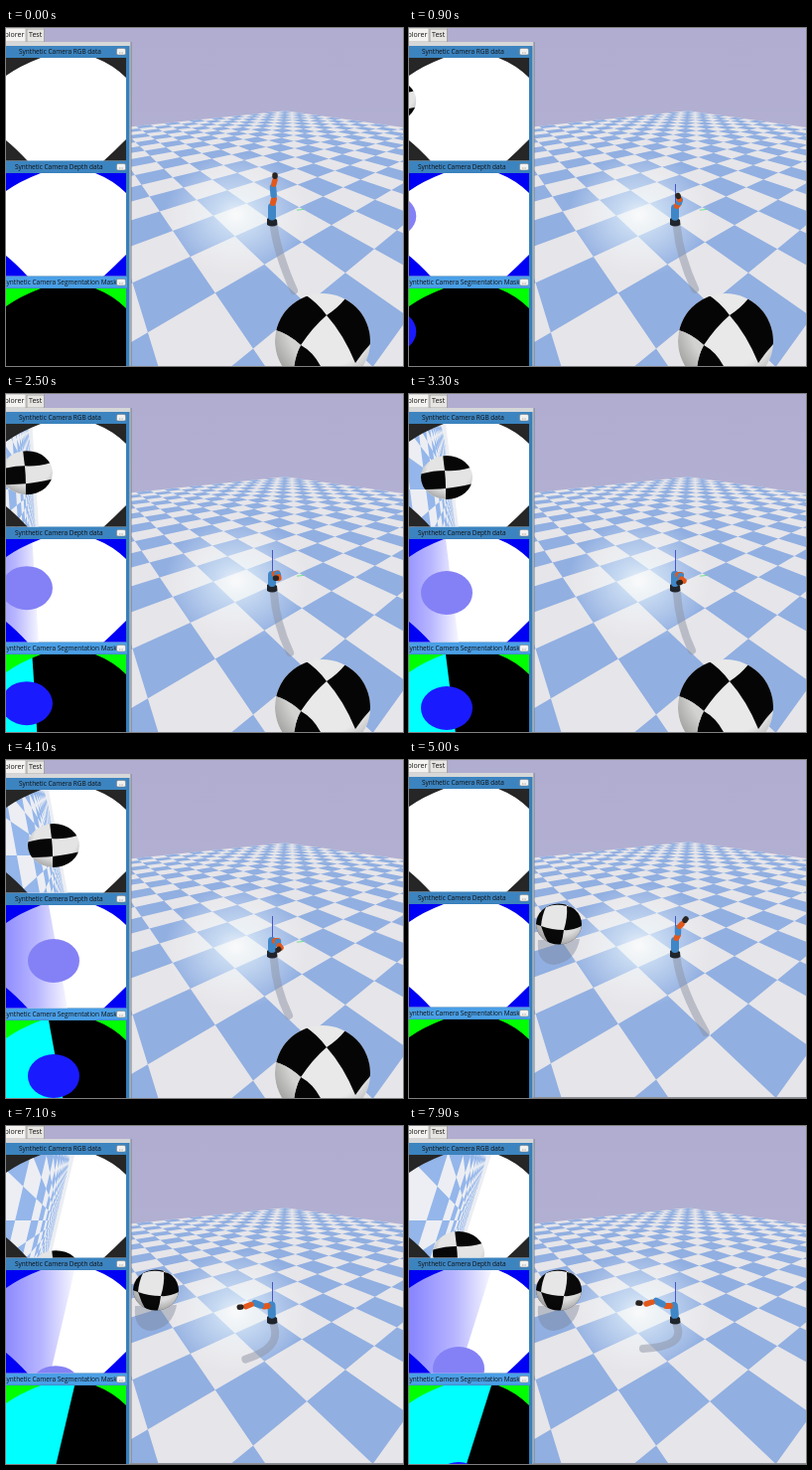
Animation of 400x340 px, one loop 8000 ms. Source, as an HTML page:

```html
<!DOCTYPE html>
<html>
<head>
<meta charset="utf-8">
<style>
html, body { margin: 0; width: 100%; height: 100%; overflow: hidden; background: #b1aed1; }
svg { display: block; width: 400px; height: 340px; }
text { font-family: "Open Sans", "Noto Sans", sans-serif; fill: #111; }
</style>
</head>
<body>
<svg viewBox="0 0 400 340">
  <defs>
    <linearGradient id="sky" x2="0" y2="1"><stop stop-color="#b0add0"/><stop offset="1" stop-color="#b6b5d6"/></linearGradient>
    <radialGradient id="shine"><stop stop-color="#fff" stop-opacity=".8"/><stop offset=".3" stop-color="#f0fbff" stop-opacity=".55"/><stop offset="1" stop-color="#fff" stop-opacity="0"/></radialGradient>
    <linearGradient id="depth"><stop stop-color="#6f6cff"/><stop offset=".45" stop-color="#8b88ff"/><stop offset=".75" stop-color="#b9b7ff"/><stop offset="1" stop-color="#f6f6ff"/></linearGradient>
    <radialGradient id="round" cx=".55" cy=".35" r=".7"><stop offset=".6" stop-opacity="0"/><stop offset="1" stop-opacity=".3"/></radialGradient>
    <clipPath id="view"><rect width="121" height="103.5"/></clipPath>
    <clipPath id="bigClip"><circle cx="319" cy="315" r="48"/></clipPath>
    <clipPath id="smallClip"><ellipse cx="151" cy="165" rx="23" ry="20.5"/></clipPath>
    <clipPath id="camClip"><ellipse rx="26" ry="22"/></clipPath>
  </defs>
  <rect width="400" height="340" fill="url(#sky)"/>
  <g id="world">
    <path id="plane" fill="#e6e5e9"/>
    <path id="tiles" fill="#91afe1"/>
    <ellipse cx="232" cy="188" rx="72" ry="62" fill="url(#shine)"/>
  </g>
  <path id="shadow" fill="none" stroke="#8d93a4" stroke-opacity=".5" stroke-width="8" stroke-linecap="round" stroke-linejoin="round"/>
  <g id="bigBall" clip-path="url(#bigClip)">
    <rect x="270" y="265" width="100" height="80" fill="#e9e9e9"/>
    <path d="M298 266Q314 276 323 289Q309 301 297 319Q283 306 268 303V268Z" fill="#050505"/>
    <path d="M323 289Q334 282 342 272L372 290V313Q362 322 352 337Q340 308 323 289Z" fill="#050505"/>
    <path d="M297 319Q310 326 318 342H290Q291 330 297 319Z" fill="#050505"/>
    <path d="M268 303Q283 306 297 319Q291 330 290 345H268Z" fill="#d2d2d0"/>
    <circle cx="319" cy="315" r="48" fill="url(#round)"/>
  </g>
  <g id="smallBall">
    <path d="M130 181Q128 205 146 206Q168 203 172 180Z" fill="#777f95" opacity=".4"/>
    <g clip-path="url(#smallClip)">
      <rect x="126" y="143" width="50" height="46" fill="#090909"/>
      <path d="M138 148Q148 144 159 147Q160 158 156 171Q144 171 133 167Q134 156 138 148Z" fill="#e6e6e6"/>
      <path d="M156 171Q165 172 176 166V188H152Q155 180 156 171Z" fill="#dcdcdc"/>
      <path d="M133 167Q136 177 142 187H124V164Z" fill="#cfcfcf"/>
      <path d="M159 147Q166 148 172 153L165 142H156Z" fill="#ddd"/>
      <ellipse cx="151" cy="165" rx="23" ry="20.5" fill="url(#round)"/>
    </g>
  </g>
  <path d="M268.5 157V188" stroke="#4856c4"/>
  <path id="green" d="M293 183.2L300 182.4" stroke="#52e07c" stroke-width=".8"/>
  <g id="arm" stroke-linecap="round"></g>
  <g id="panel">
    <path d="M0 -2H38V14H0Z" fill="#e2e1df"/>
    <path d="M-2 0H20V14H-2Z" fill="#f4f3f1" stroke="#aaa8a6" stroke-width=".8"/>
    <path d="M21 1H38.5V14H21Z" fill="#e6e5e2" stroke="#999" stroke-width=".8"/>
    <text x="-1.5" y="8.500" font-size="7">plorer</text>
    <text x="23" y="9" font-size="7">Test</text>
    <path d="M0 14H126V342H0Z" fill="#d5d7d8"/>
    <path d="M126 14V342" stroke="#777e8a"/>
    <path d="M0 18H124.5V342H0Z" fill="#397fb8"/>
    <g id="cams"></g>
  </g>
  <path id="foot" d="M125 339.5H400" stroke="#8e9098"/>
</svg>
<script>
const $ = id => document.getElementById(id);
const NS = 'http://www.w3.org/2000/svg';
const LOOP = 8000, CUT = 4500, VIEW_H = 103;

// Static checkered floor: one-metre tiles around the robot base, seen in perspective
const YAW = 0.14, HORIZON = 52.5;
function floorPoint(a, b) {
  const lat = (a - b) * Math.SQRT1_2, fwd = (a + b) * Math.SQRT1_2;
  const side = lat + YAW * fwd, u = fwd - YAW * lat, den = 1 + 0.169 * u;
  return { x: (266.4 + 41.7 * side + 42.4 * u) / den, y: HORIZON + 140.9 / den, den };
}
const poly = pts => 'M' + pts.map(p => p.x.toFixed(1) + ' ' + p.y.toFixed(1)).join('L') + 'Z';

function drawFloor() {
  let d = '';
  for (let i = -15; i < 15; i++) for (let j = -15; j < 15; j++) {
    if ((i + j) & 1) continue;
    const quad = [floorPoint(i, j), floorPoint(i + 1, j), floorPoint(i + 1, j + 1), floorPoint(i, j + 1)];
    if (quad.every(p => p.den > 0.2)) d += poly(quad);
  }
  $('tiles').setAttribute('d', d);
  $('plane').setAttribute('d', poly([floorPoint(15, 15), floorPoint(15, -3),
    { x: 700, y: 400 }, { x: -200, y: 400 }, floorPoint(-3, 15)]));
}

// Three synthetic camera views share one layout
const CORNERS = 'M0 0H35Q14 8 0 18ZM90 0H121V20Q108 7 90 0ZM121 82V104H98Q109 94 121 82ZM0 83Q10 91 22 104H0Z';
const checker = `<g clip-path="url(#camClip)"><rect x="-27" y="-23" width="54" height="46" fill="#e4e4e4"/>
  <path d="M-4 -24Q-3 -14 -2 -7Q10 -6 24 -10L28 -24ZM-2 -7Q-14 -7 -28 -3V12Q-12 12 -1 11Q-1 2 -2 -7ZM-1 11Q10 10 27 6V24H-1Z" fill="#070707"/>
  <ellipse rx="26" ry="22" fill="url(#round)"/></g>`;
const flatBall = color => `<ellipse rx="26" ry="22" fill="${color}"/>`;
const views = [
  { title: 'Synthetic Camera RGB data', x: 13, y: 30, bar: '#3c84c0', back: '#fff', ground: '#eceef3', corner: '#262626', ball: checker },
  { title: 'Synthetic Camera Depth data', x: 9, y: 146, bar: '#3c84c0', back: '#fff', ground: 'url(#depth)', corner: '#0000f4', ball: flatBall('#8481f6') },
  { title: 'Synthetic Camera Segmentation Mask', x: -3, y: 262, bar: '#4a9fe6', back: '#000', ground: '#0ff', corner: '#0f0', ball: flatBall('#1a1aff') }
];
$('cams').innerHTML = views.map((v, n) => `
  <g transform="translate(0 ${v.y})">
    <rect y="-12" width="122" height="11.5" fill="${v.bar}"/>
    <text x="${v.x}" y="-4.400" font-size="6.5">${v.title}</text>
    <rect x="111.500" y="-9.500" width="9" height="6.500" rx="1.500" fill="#f2f2f0" stroke="#777" stroke-width=".5"/>
    <path d="M114 -5H118" stroke="#888" stroke-width=".7" stroke-dasharray="1 .6"/>
    <g clip-path="url(#view)">
      <rect width="121" height="104" fill="${v.back}"/>
      <path class="ground" fill="${v.ground}"/>
      ${n ? '' : '<path id="camTiles" fill="#94b6ea"/>'}
      <g class="ball">${v.ball}</g>
      <path d="${CORNERS}" fill="${v.corner}"/>
    </g>
  </g>`).join('');
const grounds = document.querySelectorAll('.ground'), balls = document.querySelectorAll('.ball');

// arm: five joints above the base; shade: bend and tip of the shadow;
// edge: ground border at top and bottom of a view; ball: its centre there
const keys = [
  { t: 0, arm: [268, 180, 270, 172, 269, 160, 271, 153, 271, 148], shade: [274, 228, 290, 264], edge: [-60, -60], ball: [-60, 40] },
  { t: 1800, arm: [268, 182, 273, 179, 275, 181, 273, 183, 271, 181], shade: [272, 230, 287, 262], edge: [17, 18], ball: [6, 45] },
  { t: 3300, arm: [268, 182, 274, 182, 273, 185, 277, 188, 272, 190], shade: [272, 230, 285, 258], edge: [37, 50], ball: [38, 54] },
  { t: 4100, arm: [268, 182, 274, 182, 274, 185, 277, 189, 274, 191], shade: [272, 230, 285, 257], edge: [43, 62], ball: [48, 56] },
  { t: 5000, arm: [268, 182, 271, 176, 271, 169, 275, 165, 279, 160], shade: [274, 230, 299, 274], edge: [-60, -80], ball: [50, 160] },
  { t: 6400, arm: [268, 180, 261, 182, 252, 180, 244, 184, 239, 186], shade: [277, 225, 246, 244], edge: [57, 40], ball: [50, 135] },
  { t: 7900, arm: [267, 181, 259, 181, 249, 176, 239, 179, 231, 178], shade: [278, 222, 236, 224], edge: [83, 50], ball: [50, 99] }
];
const mix = (p, q, k) => p.map((v, i) => v + (q[i] - v) * k);

function poseAt(t) {
  const part = keys.filter(k => (k.t < CUT) === (t < CUT));
  let n = 0;
  while (n < part.length - 2 && t >= part[n + 1].t) n++;
  const a = part[n], b = part[n + 1];
  let k = Math.max(0, Math.min(1, (t - a.t) / (b.t - a.t)));
  if (n === 0) k *= 1.5 - 0.5 * k; // each sweep starts fast, then settles
  const pose = {};
  for (const name of ['arm', 'shade', 'edge', 'ball']) pose[name] = mix(a[name], b[name], k);
  return pose;
}

const parts = ['#3f86c6', '#e2581c', '#3f86c6', '#e2581c', '#2a2422'].map(color => {
  const link = document.createElementNS(NS, 'line');
  link.setAttribute('stroke', color);
  return link;
});
$('arm').innerHTML = '<path d="M263 192L267 189L273 193L273.500 198Q268 201 263 198Z" fill="#20242b"/>';
$('arm').append(...parts);

function drawArm(arm) {
  let x = 268, y = 192;
  parts.forEach((link, i) => {
    const nx = arm[2 * i], ny = arm[2 * i + 1];
    const from = [0.2, 0.5, 0.35, 0.4, 0.75][i];
    const ends = { x1: x + (nx - x) * from, y1: y + (ny - y) * from, x2: nx, y2: ny, 'stroke-width': [8, 6, 6.5, 5.5, 5.5][i] };
    for (const name in ends) link.setAttribute(name, ends[name]);
    x = nx; y = ny;
  });
}

function camTiles(top, bottom) {
  const at = (i, j) => {
    const z = 0.6 + 0.8 * i, y = 66 + 48 * j / z;
    return { x: top + (bottom - top) * y / VIEW_H - 62 / z, y };
  };
  let d = '';
  for (let i = 0; i < 22; i++) for (let j = -18; j < 18; j++) {
    if ((i + j) & 1) continue;
    d += poly([at(i, j), at(i + 1, j), at(i + 1, j + 1), at(i, j + 1)]);
  }
  return d;
}

function draw(t) {
  const { arm, shade, edge, ball } = poseAt(t);
  const late = t >= CUT, shift = `translate(0 ${late ? -1 : 0})`;
  $('world').setAttribute('transform', shift);
  $('panel').setAttribute('transform', shift);
  $('bigBall').style.display = $('green').style.display = late ? 'none' : '';
  $('smallBall').style.display = $('foot').style.display = late ? '' : 'none';
  $('shadow').setAttribute('d', `M270 201Q${shade[0]} ${shade[1]} ${shade[2]} ${shade[3]}`);
  drawArm(arm);
  grounds.forEach(g => g.setAttribute('d', `M-60 0H${Math.max(-60, edge[0])}L${Math.max(-60, edge[1])} ${VIEW_H + 1}H-60Z`));
  balls.forEach(b => b.setAttribute('transform', `translate(${ball[0]} ${ball[1]})`));
  $('camTiles').setAttribute('d', camTiles(edge[0], edge[1]));
}

drawFloor();
const start = performance.now();
function tick() {
  const t = (performance.now() - start) % LOOP;
  draw(Math.floor(t / 100) * 100);
  requestAnimationFrame(tick);
}
tick();
</script>
</body>
</html>
```
